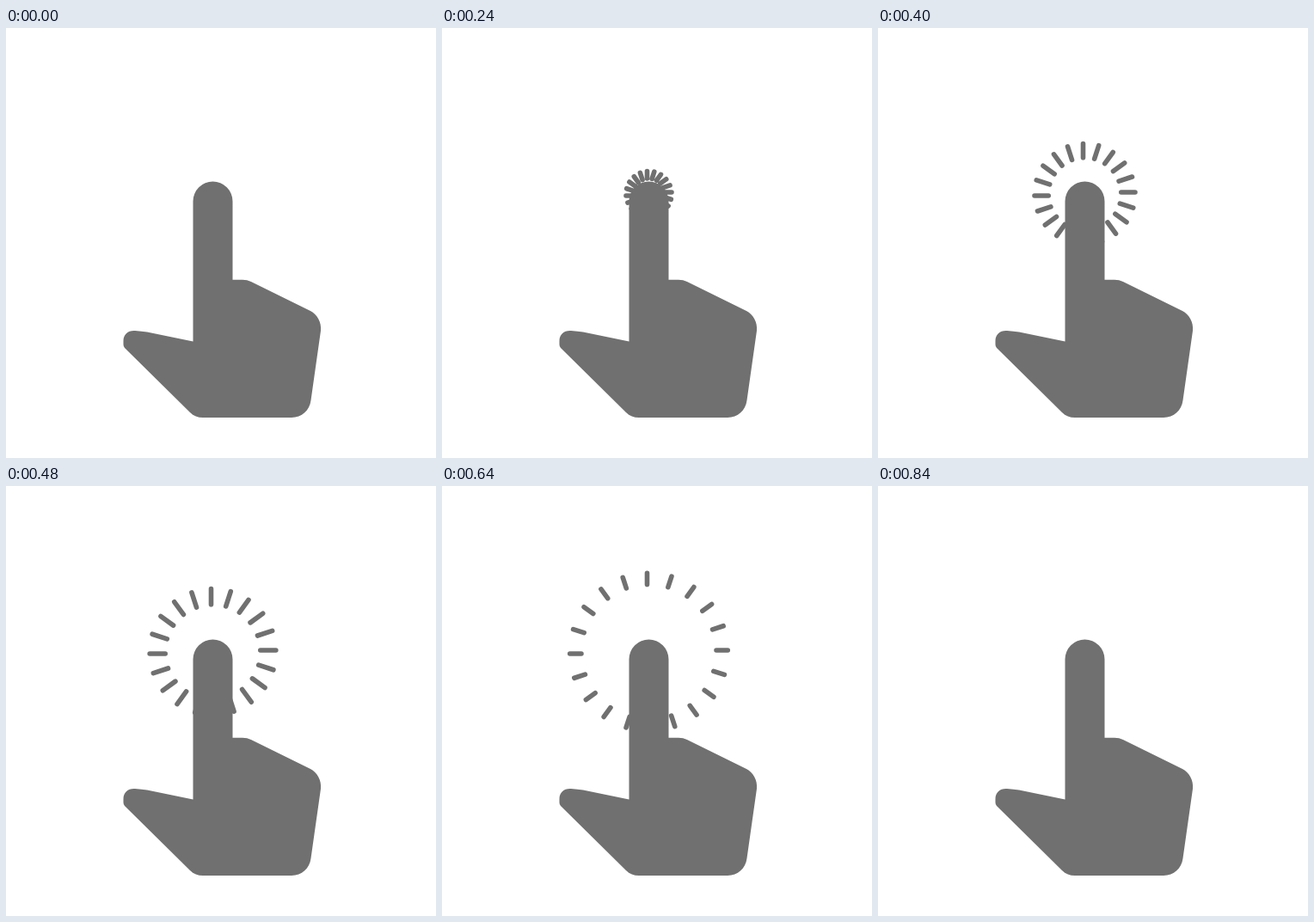
Write an HTML page that moves like this. It is 500 by 500 pixels and loops after 4.8 s.

```html
<!DOCTYPE html>
<html lang="en">
<head>
<meta charset="utf-8">
<title>Tap</title>
<style>
  html, body { margin: 0; width: 100%; height: 100%; overflow: hidden; background: #fff; }
  svg { display: block; width: 100%; height: 100%; }
</style>
</head>
<body>
<svg viewBox="0 0 500 500">
  <path id="rays" fill="none" stroke="#707070" stroke-width="5.6" stroke-linecap="round"/>
  <path fill="#707070" d="M217.5 201.5A23 23 0 0 1 263.5 201.5V292.7H275Q280.5 292.7 285 295
    L354 329C362 333.5 367 342 366 352L354.5 433C353 444.5 344 453 332 453H229
    C223 453 218 451 214 447L138 372Q136.5 370.5 136.5 368V364
    C136.5 356 142 351.5 150 352Q158 352.5 164 353.5L217.5 364.5Z"/>
</svg>
<script>
  const LOOP = 4800, STEP = 40, BURST_END = 840;
  const TIP_TIME = 680, TAIL_TIME = 850;
  const CENTER = { x: 240.5, y: 193 }, REACH = 92.7, SHIFT = -2, COUNT = 20;
  const rays = document.getElementById('rays');

  const ease = u => {
    const p = Math.min(1, Math.max(0, u));
    return p * p * (3 - 2 * p);
  };

  // Each ray runs outwards, set slightly to one side of the centre.
  function point(angle, radius) {
    const c = Math.cos(angle), s = Math.sin(angle);
    const x = CENTER.x + SHIFT * c + radius * s;
    const y = CENTER.y + SHIFT * s - radius * c;
    return x.toFixed(2) + ' ' + y.toFixed(2);
  }

  function draw(time) {
    let d = '';
    if (time < BURST_END) {
      const tip = REACH * ease(time / TIP_TIME);
      const tail = REACH * ease(time / TAIL_TIME);
      for (let i = 0; i < COUNT; i++) {
        const angle = i / COUNT * 2 * Math.PI;
        d += `M${point(angle, tail)}L${point(angle, tip)}`;
      }
    }
    rays.setAttribute('d', d);
  }

  const start = performance.now();
  function tick() {
    const time = (performance.now() - start) % LOOP;
    draw(Math.floor(time / STEP) * STEP);
    requestAnimationFrame(tick);
  }
  tick();
</script>
</body>
</html>
```
